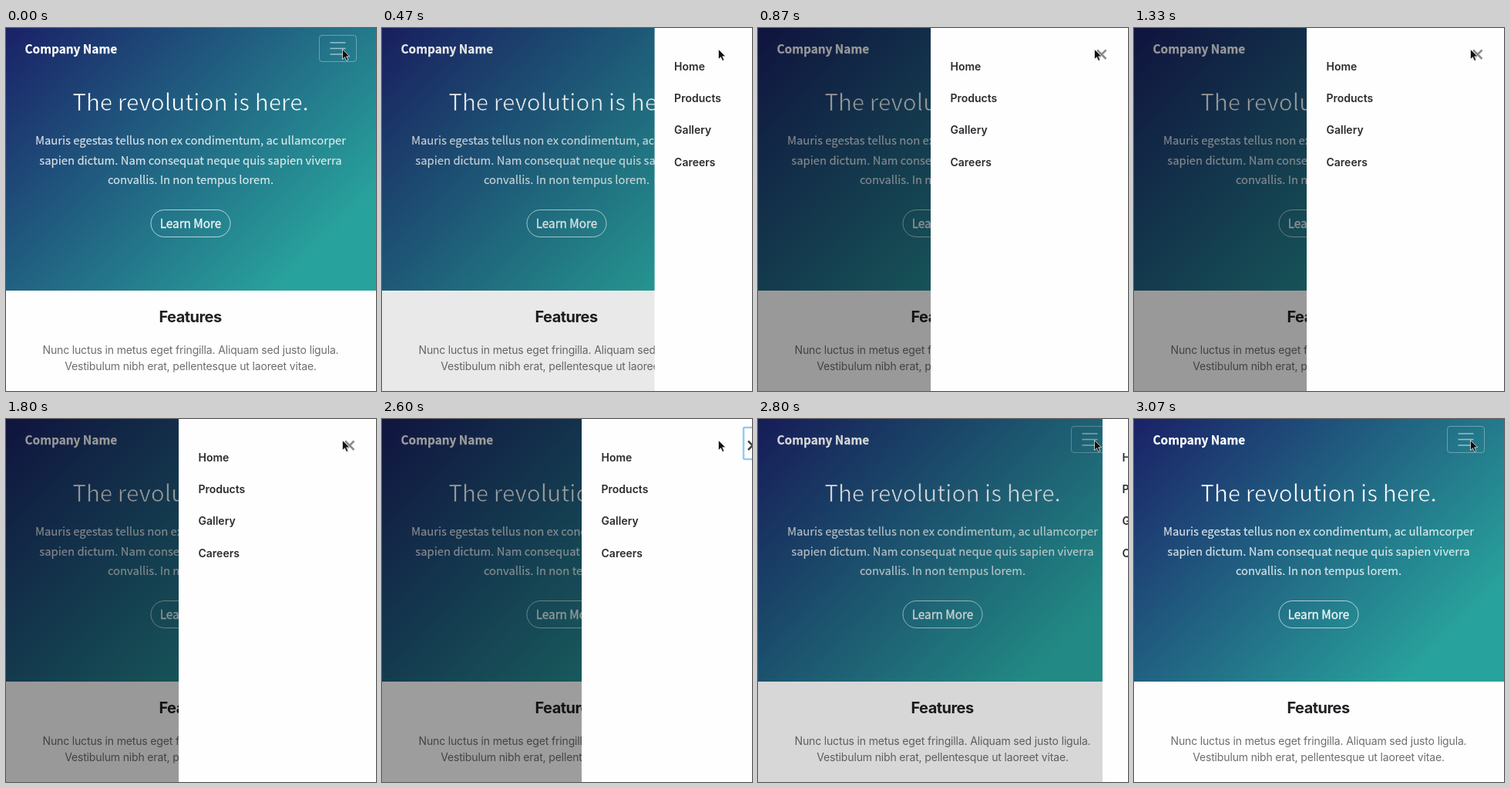
Recreate the animation shown at these times as an HTML page. Size 480x470 px, loop 3.14 s.

```html
<!DOCTYPE html>
<html lang="en">
<head>
<meta charset="utf-8">
<title>Sliding menu</title>
<style>
  html, body { margin: 0; width: 100%; height: 100%; overflow: hidden; background: #fff; }
  svg { display: block; }
  .hero { font-family: "Noto Sans CJK JP", "Noto Sans CJK SC", "Noto Sans CJK", "Open Sans", sans-serif; fill: #fff; }
  .page, .menu { font-family: Inter, Roboto, sans-serif; }
  .mid { text-anchor: middle; }
  .brand { font-size: 15.35px; font-weight: 700; stroke: #fff; stroke-width: .25; }
  /* An outline in the background colour thins the letters */
  .title { font-size: 29.6px; font-weight: 300; stroke: url(#sea); stroke-width: .7; }
  .lead { font-size: 14.8px; opacity: .83; stroke: #fff; stroke-width: .15; }
  .button { font-size: 15.3px; font-weight: 500; opacity: .92; stroke: #fff; stroke-width: .35; }
  .features { font-size: 20px; font-weight: 700; letter-spacing: -.027em; fill: #1f2023; }
  .body { font-size: 14px; letter-spacing: -.011em; fill: #6e6d70; }
  .menu { font-size: 14px; font-weight: 600; fill: #2b2c30; }
  .line { fill: none; stroke: #fff; }
</style>
</head>
<body>
<svg width="480" height="470" viewBox="0 0 480 470">
  <defs>
    <linearGradient id="sea" gradientUnits="userSpaceOnUse" x1="0" y1="0" x2="346" y2="346">
      <stop stop-color="#1a2167"/>
      <stop offset="1" stop-color="#28a29c"/>
    </linearGradient>
  </defs>

  <rect width="480" height="470" fill="#fefefe"/>
  <rect width="480" height="340" fill="url(#sea)"/>
  <g class="hero">
    <text class="brand" x="24.5" y="33">Company Name</text>
    <g class="mid">
      <text class="title" x="239.5" y="107">The revolution is here.</text>
      <g class="lead">
        <text x="239.5" y="151">Mauris egestas tellus non ex condimentum, ac ullamcorper</text>
        <text x="239.5" y="176.7">sapien dictum. Nam consequat neque quis sapien viverra</text>
        <text x="239.5" y="202.4">convallis. In non tempus lorem.</text>
      </g>
      <text class="button" x="239.5" y="259">Learn More</text>
    </g>
  </g>
  <rect class="line" x="188" y="235.5" width="103" height="35" rx="17.5" stroke-opacity=".65"/>
  <rect class="line" x="406.5" y="9.5" width="48" height="34" rx="3.5" stroke-opacity=".32"/>
  <path class="line" d="M420.5 19h20M420.5 26.5h20M420.5 34h20" stroke-width="1.4" stroke-opacity=".55"/>

  <g class="page mid">
    <text class="features" x="239" y="381">Features</text>
    <g class="body">
      <text x="239.5" y="422">Nunc luctus in metus eget fringilla. Aliquam sed justo ligula.</text>
      <text x="239.5" y="443">Vestibulum nibh erat, pellentesque ut laoreet vitae.</text>
    </g>
  </g>

  <rect id="shade" width="480" height="470" opacity="0"/>
  <g id="panel" class="menu" transform="translate(480)">
    <rect width="256" height="470" fill="#fefefe"/>
    <text x="25.5" y="55">Home</text>
    <text x="25.5" y="96.2">Products</text>
    <text x="25.5" y="137.4">Gallery</text>
    <text x="25.5" y="178.6">Careers</text>
    <path id="cross" d="M216 28.5l11.5 11.5m0-11.5l-11.5 11.5" stroke-width="2.5"/>
    <rect id="ring" x="210" y="11" width="25" height="41" rx="1.5" fill="none" stroke="#94cbf0" stroke-width="2.5"/>
  </g>
  <path d="M436.5 27.5v13l3-2.8 2.2 4.8 2.2-1-2.2-4.7h4z" fill="#111" stroke="#fff" stroke-width=".7"/>
</svg>
<script>
const LOOP = 3140, STEP = 200 / 3;
const OPEN = 339, CLOSE = 2545, SLIDE = 440;
const [shade, panel, cross, ring] =
  ["shade", "panel", "cross", "ring"].map(id => document.getElementById(id));

const clamp = v => Math.min(1, Math.max(0, v));
const smooth = v => v * v * (3 - 2 * v);
const bezier = (a, b, u) => 3 * (1 - u) ** 2 * u * a + 3 * (1 - u) * u * u * b + u ** 3;

// The CSS "ease" curve
function ease(x) {
  let lo = 0, hi = 1;
  for (let i = 0; i < 24; i++) {
    const u = (lo + hi) / 2;
    if (bezier(.25, .25, u) < x) lo = u; else hi = u;
  }
  return bezier(.1, 1, hi);
}

function draw(now) {
  // Motion runs at 15 pictures a second
  const t = Math.floor((now % LOOP + 4) / STEP) * STEP;
  const opening = clamp((t - OPEN) / SLIDE);
  const closing = clamp((t - CLOSE) / SLIDE);
  const focused = t > CLOSE - 20;
  const shown = ease(opening) - ease(closing);

  panel.setAttribute("transform", `translate(${480 - 256 * shown})`);
  shade.setAttribute("opacity", .4 * (smooth(opening) - smooth(closing)));
  cross.setAttribute("stroke", focused ? "#404040" : "#8b8b8b");
  ring.setAttribute("visibility", focused ? "visible" : "hidden");
  requestAnimationFrame(() => draw(performance.now() - start));
}

const start = performance.now();
draw(0);
</script>
</body>
</html>
```
